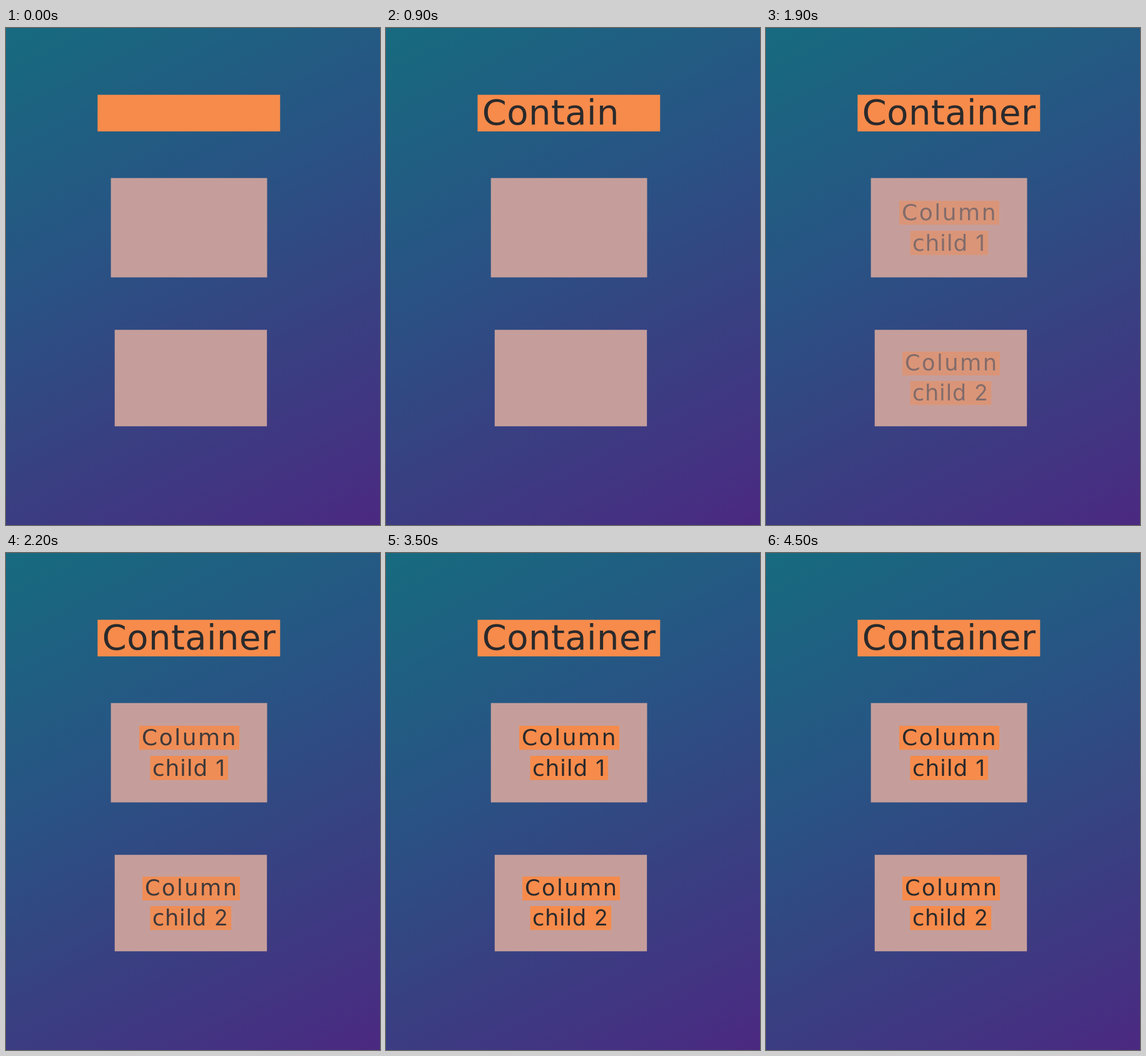
Recreate the animation shown at these times as an HTML page. Size 598x794 px, loop 4600 ms.

```html
<!DOCTYPE html>
<html lang="en">
<head>
<meta charset="utf-8">
<title>Container and columns</title>
<style>
  html, body { margin: 0; width: 100%; height: 100%; overflow: hidden; }
  body {
    background: linear-gradient(153deg, #176a7f 2%, #285484 38%, #344582 60%, #4b2981 100%);
  }
  svg { display: block; width: 598px; height: 794px; }
  text {
    font-family: "DejaVu Sans", sans-serif;
    fill: #2a2a2c;
    white-space: pre;
  }
  .box { fill: #c59e9b; }
  .band { fill: #f68b4b; }
  #title { font-size: 56px; letter-spacing: .008em; }
  #labels { opacity: 0; }
  #labels text { font-size: 36px; }
  #labels .second { font-size: 35.2px; }
  #labels .column { letter-spacing: .07em; }
  #labels .child { letter-spacing: .02em; }
  .digit { font-family: Inter, sans-serif; }
</style>
</head>
<body>
<svg viewBox="0 0 598 794">
  <rect class="band" x="146.4" y="106.7" width="291.9" height="58.5"/>
  <text id="title" x="153.7" y="153.7"></text>

  <rect class="box" x="167.7" y="239.7" width="249.8" height="158.7"/>
  <rect class="box" x="173.8" y="482.2" width="243.4" height="154.1"/>

  <g id="labels">
    <rect class="band" x="213" y="276" width="160" height="38.3"/>
    <rect class="band" x="230.6" y="324" width="124.6" height="38.7"/>
    <text class="column" x="217" y="307">Column</text>
    <text class="child" x="234" y="356.3">child <tspan class="digit">1</tspan></text>

    <rect class="band" x="218" y="517" width="156" height="38"/>
    <rect class="band" x="230.6" y="564" width="129.6" height="38.3"/>
    <text class="column second" x="222" y="547.3">Column</text>
    <text class="child second" x="234" y="595.3">child <tspan class="digit">2</tspan></text>
  </g>
</svg>
<script>
  const LOOP = 4600, STEP = 100;
  const WORD = "Container", TYPE_START = 200;
  const FADE_START = 1600, FADE_TIME = 700;

  const title = document.getElementById("title");
  const labels = document.getElementById("labels");
  const start = performance.now();
  const clamp = (v, max) => Math.max(0, Math.min(max, v));

  function draw() {
    // The picture advances in whole steps.
    const elapsed = (performance.now() - start) % LOOP;
    const t = Math.floor(elapsed / STEP) * STEP;
    const typed = WORD.slice(0, clamp((t - TYPE_START) / STEP, WORD.length));
    if (title.textContent !== typed) title.textContent = typed;
    labels.style.opacity = clamp((t - FADE_START) / FADE_TIME, 1);
    requestAnimationFrame(draw);
  }
  draw();
</script>
</body>
</html>
```
